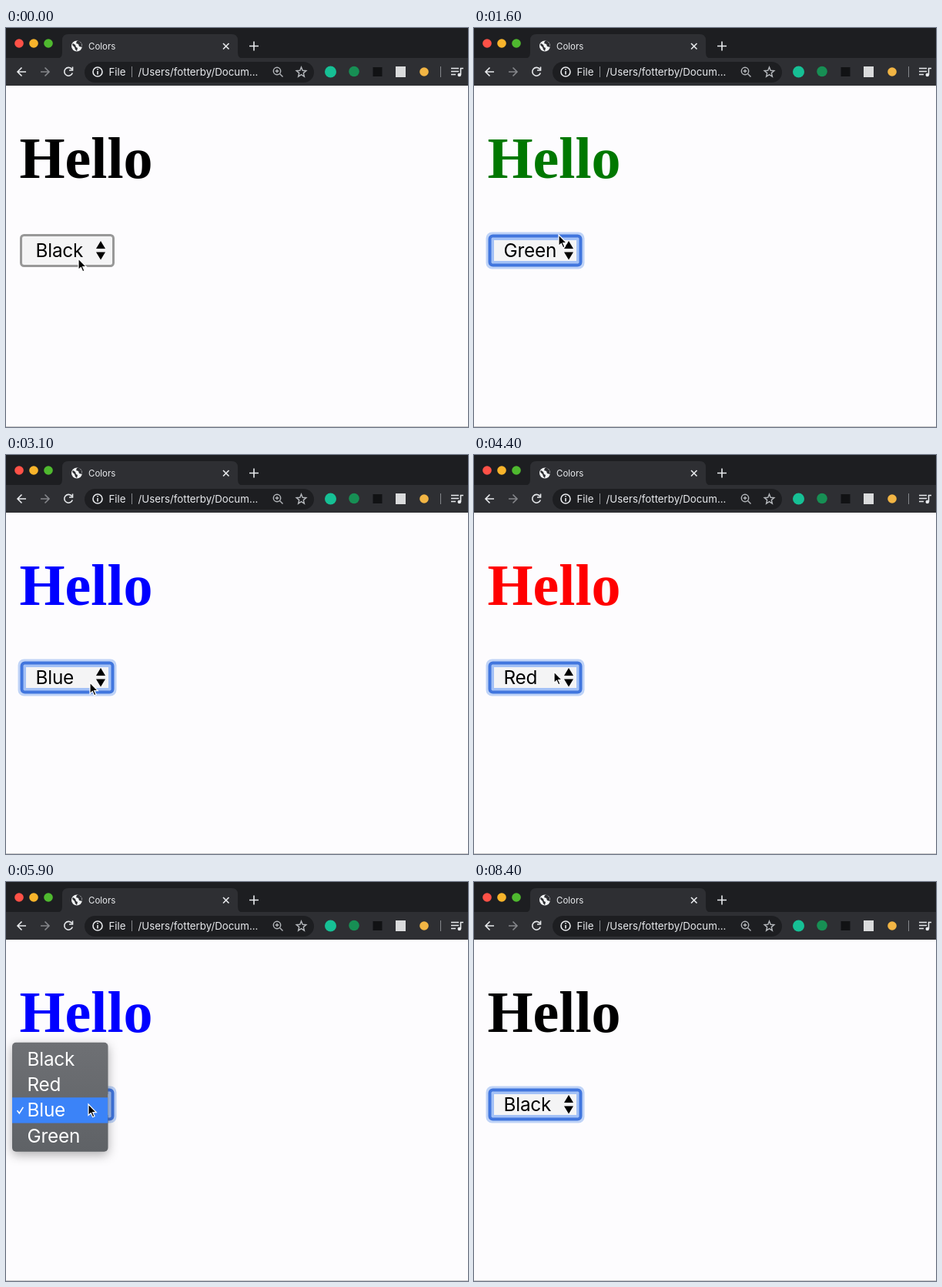
Animation of 600 by 519 pixels, one loop 8.5 s. Source, as an HTML page:

```html
<!DOCTYPE html>
<html lang="en">
<head>
<meta charset="utf-8">
<title>Colors</title>
<style>
  html, body { margin: 0; width: 100%; height: 100%; overflow: hidden; background: #fdfcfe; }
  svg { display: block; width: 600px; height: 519px; font-family: Inter, "Open Sans", sans-serif; }
  .line { fill: none; stroke: #e8eaed; stroke-width: 1.6; }
  .dim { stroke: #85878b; }
  .option { font-size: 24.3px; letter-spacing: -.2px; }
  #heading { font: bold 76px "Liberation Serif", serif; }
  #menu { filter: drop-shadow(0 4px 7px rgba(0, 0, 0, .32)); }
</style>
</head>
<body>
<svg viewBox="0 0 600 519">
  <defs>
    <linearGradient id="panel" x2="0" y2="1">
      <stop stop-color="#6e7074"/><stop offset="1" stop-color="#5f6266"/>
    </linearGradient>
    <clipPath id="panelShape"><rect width="124.5" height="142" rx="5"/></clipPath>
  </defs>

  <!-- Tab strip -->
  <rect width="600" height="40" fill="#1d1e21"/>
  <circle cx="17" cy="20" r="5.8" fill="#fe5147"/>
  <circle cx="36" cy="20" r="5.8" fill="#f8b42b"/>
  <circle cx="55" cy="20" r="5.8" fill="#4fb92f"/>
  <path d="M65 40q8 0 8-8V16q0-8 8-8h212q8 0 8 8v16q0 8 8 8z" fill="#2e2f33"/>
  <circle cx="92" cy="23.5" r="7" fill="#f1f3f4"/>
  <path d="M87 20l3 2 1 3 2 1-1 4-2-2-1-3-3-3zM92 17l-1 3 3 1 1 3 4 1-1-5-3-3z" fill="#2e2f33"/>
  <text x="107" y="27.5" font-size="11.5" fill="#e8eaed">Colors</text>
  <path class="line" d="M282 20l7.5 7.5m0-7.5L282 27.500M316 23.500h12m-6-6v12"/>

  <!-- Toolbar -->
  <rect y="39" width="600" height="36" fill="#2e2f33"/>
  <path class="line" d="M26 57H15m5.500-5.500L15 57l5.500 5.500"/>
  <path class="line dim" d="M45 57h11m-5.500-5.500L56 57l-5.500 5.500"/>
  <path class="line" d="M85.500 53.500A5.400 5.400 0 1 0 86.300 58.500M86.500 50.500v4.500h-4.500"/>
  <rect x="102" y="44" width="298" height="27" rx="13.500" fill="#1d1e21"/>
  <g class="line" stroke-width="1.300">
    <circle cx="119" cy="57" r="6"/><path d="M119 56v4.500M119 53v1.600"/>
  </g>
  <g font-size="13.3" fill="#e8eaed">
    <text x="133.500" y="62">File</text>
    <text x="171.500" y="62">/Users/fotterby/Docum...</text>
  </g>
  <path class="line dim" style="stroke-width:1" d="M163.500 50v14M564.500 50v14"/>
  <g class="line" style="stroke:#b4b7bb;stroke-width:1.400">
    <circle cx="352" cy="56" r="4.700"/><path d="M355.500 59.500l4 4M349.700 56h4.600m-2.300-2.300v4.600"/>
    <path d="M383.500 51l1.700 4.300 4.600.3-3.500 3 1.100 4.500-3.900-2.500-3.900 2.500 1.100-4.500-3.500-3 4.600-.3z"/>
  </g>
  <circle cx="421.500" cy="57" r="7.500" fill="#16c095"/>
  <circle cx="452" cy="56.500" r="6.800" fill="#178f54"/>
  <rect x="476.500" y="51" width="12" height="12" fill="#111214"/>
  <rect x="506" y="50" width="13" height="14" fill="#dadbdc"/>
  <circle cx="543" cy="57" r="5.800" fill="#f2b544"/>
  <path class="line" d="M578 52.500h10M578 56.500h10M578 60.500h6M590.500 61v-8.500h3.500"/>
  <circle cx="588.800" cy="61" r="2.300" fill="#e8eaed"/>

  <!-- Page -->
  <rect y="75" width="600" height="444" fill="#fdfcfe"/>
  <path d="M0 518.500h600" stroke="#c9c9cb"/>
  <text id="heading" x="17.500" y="194.500">Hello</text>
  <rect x="19.500" y="269.500" width="120" height="40" rx="4" fill="#f4f4f5" stroke="#989898" stroke-width="3"/>
  <g id="focus" fill="none">
    <rect x="17.500" y="267.500" width="124" height="44" rx="6" stroke="#bfd3f7" stroke-width="4"/>
    <rect x="24" y="274" width="111" height="31" rx="2" stroke="#a3c1f6" stroke-width="4"/>
    <rect x="20.500" y="270.500" width="118" height="38" rx="4" stroke="#4176de" stroke-width="4"/>
  </g>
  <text id="value" class="option" x="38.500" y="298"></text>
  <path d="M117 287l6-10 6 10zM117 291.500h12l-6 10z"/>
  <g id="menu">
    <rect width="124.500" height="142" rx="5" fill="url(#panel)"/>
    <rect id="highlight" width="124.500" fill="#3b83f8" clip-path="url(#panelShape)"/>
    <g id="items" class="option" fill="#fff"></g>
    <path id="check" d="M6.500 0l2.800 3.500 5-8" fill="none" stroke="#fff" stroke-width="1.600"/>
  </g>
  <path id="cursor" d="M0 0V14.500L3.300 11.500 5.600 16.800 8 15.800 5.700 10.600H10.300Z" stroke="#fff" stroke-width="1.200"/>
</svg>
<script>
const LOOP = 8500, STEP = 100, ROW = 33.3, PAD = 5, LEFT = 8;
const names = ["Black", "Red", "Blue", "Green"];
const colors = ["#000", "#007800", "#00f", "#f00"];
const colorOf = { Black: colors[0], Green: colors[1], Blue: colors[2], Red: colors[3] };

// Each visit to the menu: opening time, click time, item before, item picked.
const visits = [
  [300, 900, 0, 3], [1900, 2500, 3, 2], [3300, 3800, 2, 1],
  [4500, 5400, 1, 2], [5800, 6900, 2, 0]
].map(([open, click, from, pick]) => ({ open, click, from, pick }));

// Pointer stops: time, x, y.
const stops = [
  [0, 94, 300], [300, 94, 300], [800, 84, 388], [1100, 84, 388],
  [1600, 110, 269], [1800, 105, 285], [1900, 105, 285], [2400, 107, 258],
  [2800, 107, 258], [3100, 109, 296], [3300, 109, 294], [3700, 104, 258],
  [4100, 104, 258], [4400, 104, 282], [4500, 104, 284], [4900, 100, 355],
  [5300, 105, 322], [5600, 105, 322], [5800, 107, 289], [5900, 107, 289],
  [6600, 82, 230], [7200, 82, 230], [7500, 236, 396], [7600, 236, 396],
  [8400, 308, 525], [LOOP, 308, 525]
];

const el = id => document.getElementById(id);
const set = (id, attrs) => {
  for (const key in attrs) el(id).setAttribute(key, attrs[key]);
};

names.forEach((name, i) => {
  const text = document.createElementNS("http://www.w3.org/2000/svg", "text");
  text.setAttribute("x", 19.5);
  text.setAttribute("y", PAD + ROW * i + 25);
  text.textContent = name;
  el("items").append(text);
});

function pointerAt(t) {
  const i = stops.findIndex(stop => stop[0] > t);
  const [t0, x0, y0] = stops[i - 1], [t1, x1, y1] = stops[i];
  const k = (t - t0) / (t1 - t0), ease = k * k * (3 - 2 * k);
  return [x0 + (x1 - x0) * ease, y0 + (y1 - y0) * ease];
}

function menuAlpha(visit, t) {
  if (t <= visit.click) return 1;
  return t <= visit.click + 100 ? 0.6 : 0.22;
}

function draw(t) {
  const [x, y] = pointerAt(t);
  const done = visits.filter(v => t >= v.click + 300).pop();
  const name = names[done ? done.pick : 0];
  el("heading").setAttribute("fill", colorOf[name]);
  el("value").textContent = name;
  set("focus", { visibility: t >= visits[0].open ? "visible" : "hidden" });
  set("cursor", { transform: `translate(${x} ${y})` });

  const visit = visits.find(v => t >= v.open && t < v.click + 300);
  set("menu", { visibility: visit ? "visible" : "hidden" });
  if (!visit) return;
  // The current item always opens on top of the select box.
  const top = 275.3 - ROW * visit.from;
  const row = Math.max(0, Math.min(3, Math.floor((y - top - PAD) / ROW)));
  set("menu", { transform: `translate(${LEFT} ${top})`, opacity: menuAlpha(visit, t) });
  set("highlight", { y: row ? PAD + ROW * row : 0, height: row ? ROW : ROW + PAD });
  set("check", { transform: `translate(0 ${PAD + ROW * visit.from + 17})` });
}

function frame() {
  draw(Math.floor(performance.now() % LOOP / STEP) * STEP);
  requestAnimationFrame(frame);
}
frame();
</script>
</body>
</html>
```
